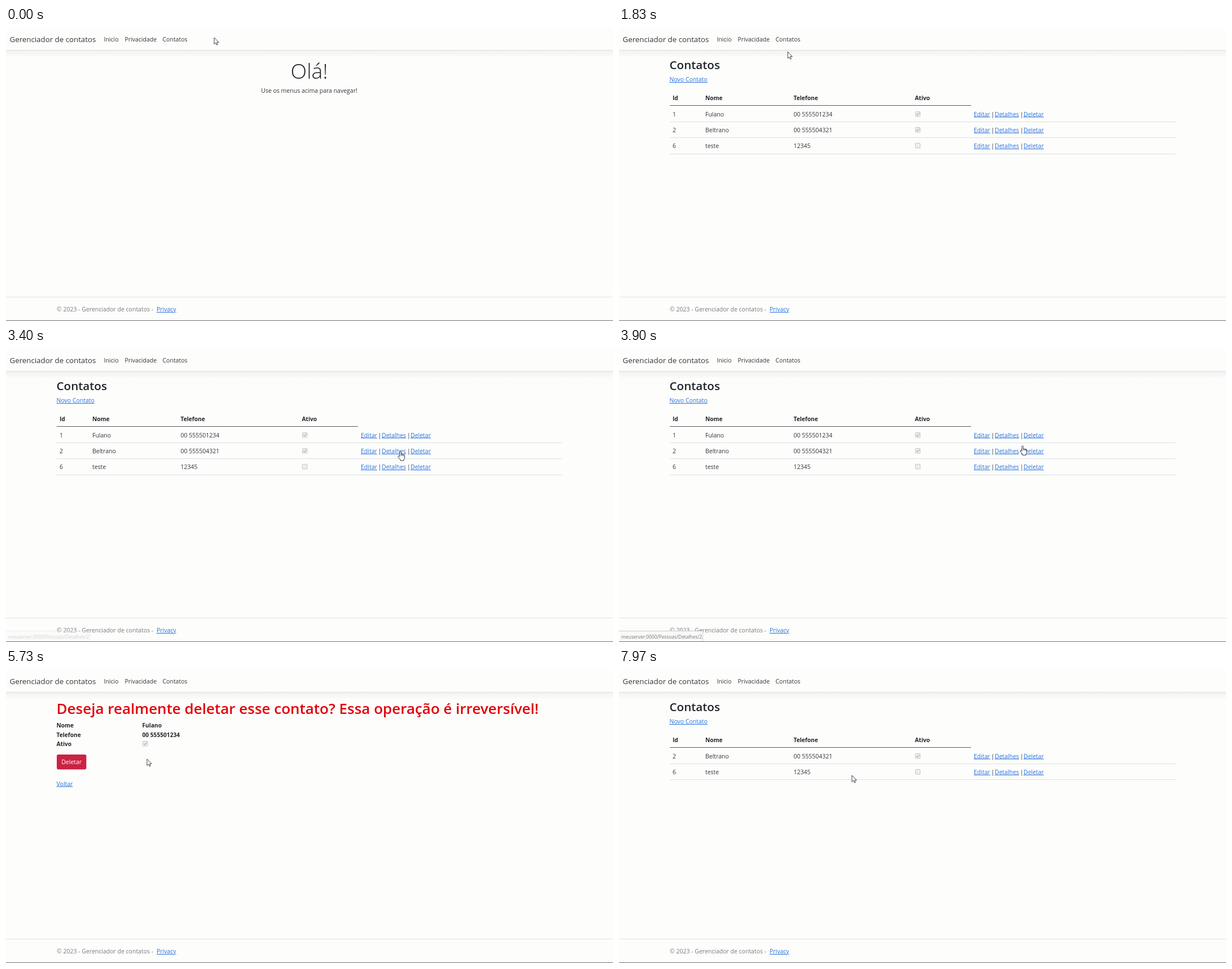
Recreate the animation shown at these times as an HTML page. Size 1076x520 px, loop 8 s.

```html
<!DOCTYPE html>
<html lang="pt">
<head>
<meta charset="utf-8">
<title>Gerenciador de contatos</title>
<style>
  html, body { margin: 0; width: 100%; height: 100%; overflow: hidden; background: #fdfdfc; }
  svg { display: block; width: 1076px; height: 520px; }
  text { font: 10.5px "Open Sans", "Noto Sans", sans-serif; fill: #33363a; white-space: pre; }
  .brand { font-size: 13.3px; }
  .mute { fill: #757a80; }
  .bold { font-weight: 700; font-size: 10.2px; fill: #212529; }
  .title { font-weight: 600; font-size: 20.6px; fill: #212529; }
  .warn { font-weight: 600; font-size: 26px; fill: #e00008; }
  .hello { font-weight: 300; font-size: 37.5px; fill: #212529; text-anchor: middle; }
  .mid { text-anchor: middle; }
  .link { fill: #2a72dc; text-decoration: underline; }
  .white { fill: #fff; }
  .url { font-size: 8.4px; fill: #777; }
</style>
</head>
<body>
<svg id="stage" viewBox="0 0 1076 520"></svg>
<script>
const LOOP = 8000;
const HOST = 'meuserver:0000/';

const text = (x, y, s, cls = '') => `<text x="${x}" y="${y}" class="${cls}">${s}</text>`;
const rect = (x, y, w, h, fill, more = '') =>
  `<rect x="${x}" y="${y}" width="${w}" height="${h}" fill="${fill}" ${more}/>`;
const group = (id, body) => `<g id="${id}">${body}</g>`;

const checkbox = (x, y, on) =>
  rect(x + .5, y + .5, 8.4, 8.4, '#efefef', 'stroke="#c3c4c6" rx=".8"') +
  (on ? `<path d="M${x + 2.2} ${y + 4.8}l1.8 1.9 3.4-4" fill="none" stroke="#a9abb0" stroke-width="1.2"/>` : '');

const people = [
  ['1', 'Fulano', '00 555501234', true],
  ['2', 'Beltrano', '00 555504321', true],
  ['6', 'teste', '12345', false]
];

function row([id, name, phone, on], i) {
  const y = 156.5 + i * 28.3;
  return text(95, y, id) + text(153, y, name) + text(309.5, y, phone) +
    checkbox(525, Math.round(y - 9), on) +
    text(629, y, 'Editar', 'link') + text(659.5, y, '|') +
    text(666, y, 'Detalhes', 'link') + text(711, y, '|') +
    text(717, y, 'Deletar', 'link') +
    rect(90, Math.round(y + 9.5), 896, 1, '#dcdee1');
}

const list = rows =>
  text(89.5, 73, 'Contatos', 'title') + text(89.5, 95, 'Novo Contato', 'link') +
  text(95, 128, 'Id', 'bold') + text(153, 128, 'Nome', 'bold') +
  text(309.5, 128, 'Telefone', 'bold') + text(524.5, 128, 'Ativo', 'bold') +
  rect(90, 137, 534, 1, '#55585c') + rows.map(row).join('');

const confirmPage =
  text(89.5, 78, 'Deseja realmente deletar esse contato? Essa operação é irreversível!', 'warn') +
  ['Nome', 'Telefone', 'Ativo'].map((s, i) => text(89.5, 102 + i * 16.5, s, 'bold')).join('') +
  text(241.5, 102, people[0][1], 'bold') + text(241.5, 118.5, people[0][2], 'bold') +
  checkbox(242, 126, true) +
  group('ring', rect(87.2, 147.2, 57.6, 31.6, '#258cfb', 'rx="4.5"') +
    rect(88.9, 148.9, 54.2, 28.2, '#fff', 'rx="3.4"')) +
  rect(90, 150, 52.4, 26.4, '#cb2343', 'rx="2.8" id="button"') +
  text(116.2, 167.3, 'Deletar', 'white mid') +
  text(89.5, 205.5, 'Voltar', 'link');

const arrow = `<path d="M0 0V11.6L2.7 9.2 4.4 13.1 6.2 12.3 4.6 8.4H8.1Z"
  fill="#fff" stroke="#2b2b38" stroke-width=".9"/>`;
const hand = `<path d="M-1.3 9V1Q-1.3-.4 0-.4T1.3 1V5.2Q2.6 4.4 3.6 5.7 5 5 5.8 6.3 7.6 5.9 7.6 7.6V10.6
  Q7.6 12.6 6.2 14.2V16H.2V14.6L-4 9.6Q-4.6 8.2-3.4 7.7-2.4 7.6-1.3 9Z"
  fill="#fff" stroke="#22222c" stroke-width=".9" stroke-linejoin="round"/>
  <path d="M1.3 5.2V8M3.6 5.7V8.2M5.8 6.3V8.5" stroke="#22222c" stroke-width=".7"/>`;

document.getElementById('stage').innerHTML =
  `<defs><linearGradient id="shade" x2="0" y2="1">
    <stop stop-color="#000" stop-opacity=".045"/><stop offset="1" stop-color="#000" stop-opacity="0"/>
  </linearGradient></defs>` +
  rect(0, 0, 1076, 520, '#fdfdfc') +
  rect(0, 40, 1076, 13, 'url(#shade)') + rect(0, 39, 1076, 1, '#dfe0dc') +
  text(6.5, 25, 'Gerenciador de contatos', 'brand') +
  text(173.5, 24, 'Inicio') + text(210.5, 24, 'Privacidade') + text(277.5, 24, 'Contatos') +
  rect(0, 477, 1076, 1, '#dfe0df') +
  text(90, 503, '© 2023 - Gerenciador de contatos -', 'mute') + text(267, 503, 'Privacy', 'link') +
  group('home', text(537.5, 89.5, 'Olá!', 'hello') +
    text(537.5, 115, 'Use os menus acima para navegar!', 'mid')) +
  group('full', list(people)) +
  group('confirm', confirmPage) +
  group('short', list(people.slice(1))) +
  group('status', rect(-1, 500.5, 143.5, 20, '#f9f9f8', 'stroke="#cbcccb" id="plate"') +
    '<text x="4" y="514" class="url" id="url"></text>') +
  rect(0, 519, 1076, 1, '#6f7070') +
  group('cursor', group('arrow', arrow) + group('hand', hand));

const $ = Object.fromEntries([...document.querySelectorAll('[id]')].map(e => [e.id, e]));

// time, x, y, shape held until the next step
const path = [
  [0, 369, 17, 'arrow'], [200, 366, 17, 'arrow'], [520, 312, 18, 'hand'], [680, 299, 19, 'hand'],
  [1700, 299, 21, 'hand'], [1770, 299, 30, 'arrow'], [1830, 299, 42, 'arrow'], [1920, 310, 55, 'arrow'],
  [2450, 735, 165, 'arrow'], [2800, 722, 190, 'arrow'], [3230, 703, 184, 'hand'], [3380, 699, 182, 'hand'],
  [3750, 699, 182, 'hand'], [4000, 726, 166, 'arrow'], [4120, 735, 157, 'hand'], [4250, 738, 155, 'hand'],
  [5250, 738, 155, 'arrow'], [5330, 736, 155, 'arrow'], [5700, 252, 158, 'arrow'], [5730, 250, 158, 'arrow'],
  [5900, 242, 158, 'arrow'], [6200, 142, 160, 'hand'], [6330, 115, 160, 'hand'],
  [7150, 115, 160, 'arrow'], [7520, 115, 160, 'arrow'], [7900, 402, 186, 'arrow'], [7970, 413, 187, 'arrow'],
  [LOOP, 413, 187, 'arrow']
];
const pages = [[0, 'home'], [1000, 'full'], [5250, 'confirm'], [7150, 'short']];
// fade-in start, fade-out start, address, plate width
const hints = [
  [640, 1020, 'Pessoas', 101],
  [3350, 4120, 'Pessoas/Detalhes/2', 148.5],
  [4120, 5280, 'Pessoas/Deletar/1', 142.5]
];

const clamp = v => Math.max(0, Math.min(1, v));
const show = (el, on) => el.setAttribute('visibility', on ? 'visible' : 'hidden');
const current = (steps, t) => steps.filter(s => s[0] <= t).pop();

function drawStatus(t) {
  const hint = current(hints, t);
  if (!hint) return $.status.setAttribute('opacity', 0);
  const [from, to, address, width] = hint;
  const fadeIn = from === 4120 ? 1 : clamp((t - from) / 160);
  $.status.setAttribute('opacity', Math.min(fadeIn, clamp(1 - (t - to) / 160)));
  $.url.textContent = HOST + address;
  $.plate.setAttribute('width', width + 1);
}

function draw(t) {
  const page = current(pages, t)[1];
  for (const [, id] of pages) $[id].style.display = id === page ? '' : 'none';

  const i = path.findIndex(p => p[0] > t);
  const [t0, x0, y0, shape] = path[i - 1], [t1, x1, y1] = path[i];
  const k = (t - t0) / (t1 - t0);
  $.cursor.setAttribute('transform', `translate(${x0 + (x1 - x0) * k} ${y0 + (y1 - y0) * k})`);
  show($.arrow, shape === 'arrow');
  show($.hand, shape === 'hand');

  const hover = clamp((t - 6200) / 150);
  const mix = (a, b) => Math.round(a + (b - a) * hover);
  $.button.setAttribute('fill', `rgb(${mix(203, 167)},${mix(35, 27)},${mix(67, 52)})`);
  show($.ring, t >= 6740);
  drawStatus(t);
}

function tick() {
  draw(performance.now() % LOOP);
  requestAnimationFrame(tick);
}
tick();
</script>
</body>
</html>
```
